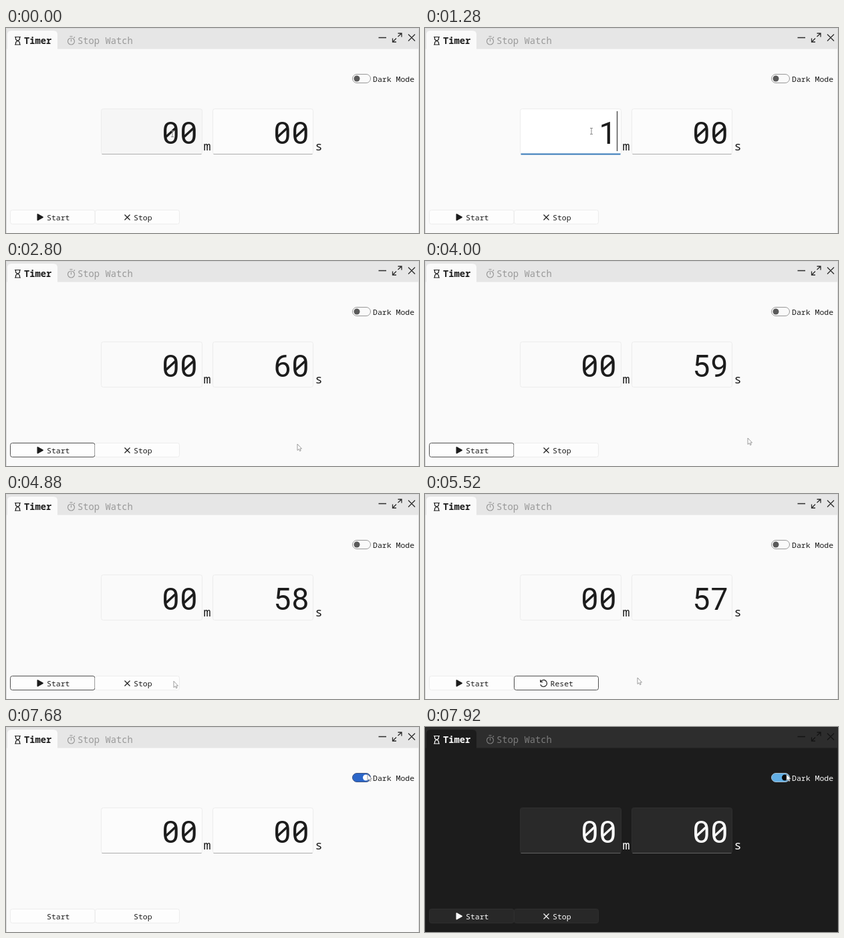
Write an HTML page that moves like this. It is 618 px wide and 308 px high and loops after 8 s.

```html
<!DOCTYPE html>
<html lang="en">
<head>
<meta charset="utf-8">
<title>Timer</title>
<style>
html, body { margin: 0; width: 100%; height: 100%; overflow: hidden; }
svg {
  display: block; width: 618px; height: 308px;
  font-family: "Roboto Mono", "Noto Sans Mono", "DejaVu Sans Mono", monospace;
  --bar: #e6e6e6; --body: #fafafa; --edge: #d9d9d9; --ink: #1c1c1c; --dim: #999;
  --field: #fcfcfc; --idle: #fafafa; --hover: #f6f6f6; --focus: #fff; --line: #ececec;
  --under: #adadad; --button: #fdfdfd; --ring: #505050; --win: #2c2c2c;
  --on: #2b66c9; --on-edge: #3f5480; --knob: #fff;
}
svg.dark {
  --bar: #2d2d2d; --body: #1c1c1c; --edge: #252525; --ink: #fafafa; --dim: #7c7c7c;
  --field: #292929; --line: #2e2e2e; --under: #626262; --button: #282828; --win: #141414;
  --on: #62aee4; --on-edge: #a9c0d0; --knob: #080808;
}
text { fill: var(--ink); white-space: pre; }
.small { font-size: 11.5px; }
.tab { font-size: 13.8px; }
.unit { font-size: 18.5px; }
.digit { font: 46px Roboto, "Open Sans", sans-serif; text-anchor: middle; }
.slash { stroke: var(--ink); stroke-width: 3.4; }
.icon { fill: none; stroke: var(--ink); stroke-width: 1.2; }
.solid { fill: var(--ink); }
.dim { stroke: var(--dim); }
.window { fill: none; stroke: var(--win); stroke-width: 1.3; }
.button { fill: var(--button); stroke: var(--line); }
.button.ring { stroke: var(--ring); }
.field { fill: var(--field); stroke: var(--line); }
.field.idle { fill: var(--idle); }
.field.hover { fill: var(--hover); }
.field.focus { fill: var(--focus); }
.under { stroke: var(--under); }
.under.focus { stroke: #3478b8; stroke-width: 2; }
</style>
</head>
<body>
<svg id="stage" viewBox="0 0 618 308">
  <rect width="618" height="308" fill="var(--body)"/>
  <rect width="618" height="31.5" fill="var(--bar)"/>
  <path d="M2 32V10Q2 4 8 4H71Q77 4 77 10V32Z" fill="var(--body)"/>
  <path d="M.5 308V.5H617.5V308" fill="none" stroke="var(--edge)"/>

  <path class="icon" d="M13 13.5H22M13 25H22M14.5 13.5V16Q14.5 18 17.5 19.2Q20.5 18 20.5 16V13.5M14.5 25V22.500Q14.5 20.500 17.5 19.2Q20.5 20.500 20.5 22.500V25"/>
  <text class="tab" x="27" y="24.300" font-weight="700">Timer</text>
  <g class="icon dim">
    <circle cx="97.500" cy="20" r="5"/>
    <path d="M95.500 12.500H99.500M97.500 16.500V20.500M101.500 15L103 13.500"/>
  </g>
  <text class="tab" x="107" y="24.300" font-weight="500" style="fill:var(--dim)">Stop Watch</text>
  <path class="window" d="M557.500 14.500H569M602 9.500L612 19.500M612 9.500L602 19.500M578.500 21L584 15.500M586.500 13L592 8M586.500 8H592V13.500M578.500 15.500V21H584"/>

  <rect id="track" x="518.500" y="69.500" width="27" height="13" rx="6.500"/>
  <circle id="knob" cy="76" r="4.500"/>
  <text class="small" x="549" y="81">Dark Mode</text>

  <g id="minutes">
    <rect class="field" x="142.500" y="121.500" width="151" height="68" rx="3"/>
    <path class="under" d="M143.500 189.500H292.500"/>
    <g class="digits" transform="translate(287 157)"></g>
  </g>
  <path id="caret" d="M287.500 125V185" stroke="var(--ink)"/>
  <text class="unit" x="295.500" y="184">m</text>
  <g id="seconds">
    <rect class="field" x="309.500" y="121.500" width="150" height="68" rx="3"/>
    <path class="under" d="M310.500 189.500H458.500"/>
    <g class="digits" transform="translate(454 157)"></g>
  </g>
  <text class="unit" x="462.500" y="184">s</text>

  <rect id="startBox" class="button" x="6.500" y="273.500" width="126.500" height="21" rx="3"/>
  <rect id="stopBox" class="button" x="133.500" y="273.500" width="126" height="21" rx="3"/>
  <text class="small" x="61" y="289">Start</text>
  <text id="stopLabel" class="small" y="289"></text>
  <g id="icons">
    <path class="solid" d="M46.500 280Q46.500 278.500 48 279.200L55.500 283.500Q56.500 284.300 55.500 285L48 289.300Q46.500 290 46.500 288.500Z"/>
    <path id="cross" class="icon" d="M177.500 280.500L185.500 288.500M185.500 280.500L177.500 288.500"/>
    <path id="redo" class="icon" d="M172.800 279V282.500H176.300M173 282.300A5 5 0 1 1 172.800 286.200"/>
  </g>

  <path id="beam" d="M-2 -4.500H2M-2 4.500H2M0 -4.500V4.500" fill="none" stroke="#8a8a8a"/>
  <path id="arrow" d="M0 0V9.500L2.200 7.500L3.700 10.700L5.200 10L3.800 7H6.500Z" fill="#fff" stroke="#858585" stroke-width=".8"/>
</svg>
<script>
const LOOP = 8000, STEP = 80, PITCH = 27;
const FOCUS = 320, START = 2160, STOP = 5200, RESET = 6240;
const TOGGLE = 7440, ICONS_OFF = 7640, DARK = 7760;
const pointer = [ // time, x, y
  [0, 249, 159], [480, 249, 155], [1520, 249, 155], [2080, 78, 284],
  [2320, 78, 284], [2800, 436, 275], [3300, 470, 270], [4000, 483, 266],
  [4400, 483, 266], [5040, 208, 284], [5240, 208, 284], [5520, 318, 276],
  [5680, 318, 276], [6080, 208, 284], [6400, 208, 284], [7280, 541, 71], [8000, 541, 71]
];
const $ = id => document.getElementById(id);
const stage = $("stage");
const show = (el, on) => { el.style.display = on ? "" : "none"; };
const ease = p => p * p * (3 - 2 * p);
const pad = n => String(n).padStart(2, "0");

function pointerAt(t) {
  const i = Math.max(1, pointer.findIndex(k => k[0] > t));
  const [t0, x0, y0] = pointer[i - 1], [t1, x1, y1] = pointer[i];
  const p = ease((t - t0) / (t1 - t0));
  return [x0 + (x1 - x0) * p, y0 + (y1 - y0) * p];
}

function typedMinutes(t) {
  if (t < 720) return "00";
  if (t < 880) return "0";
  return t < 1040 ? "" : "1";
}

// Right-aligned digits; zeros get a slash.
function digits(text) {
  return [...text].map((d, i) => {
    const x = (i - text.length + 0.5) * PITCH;
    const slash = d === "0" ? `<path class="slash" d="M${x - 7} 6.500L${x + 7} -6.500"/>` : "";
    return `<text class="digit" x="${x}" y="16.500">${d}</text>${slash}`;
  }).join("");
}

function setField(id, text, state) {
  const [box, under, group] = $(id).children;
  box.setAttribute("class", "field " + state);
  under.setAttribute("class", "under " + state);
  show(under, state !== "idle");
  if (group.dataset.text !== text) {
    group.dataset.text = text;
    group.innerHTML = digits(text);
  }
}

function render(t) {
  const dark = t >= DARK;
  const running = t >= START && t < RESET;
  const focused = t >= FOCUS && t < START;
  const stopped = t >= STOP && t < RESET;
  const left = 60 - Math.floor((Math.min(t, STOP) - START) / 1000);
  stage.classList.toggle("dark", dark);

  const minuteState = running ? "idle" : focused ? "focus" : t < FOCUS ? "hover" : "";
  setField("minutes", t < START ? typedMinutes(t) : "00", minuteState);
  setField("seconds", running ? pad(left) : "00", running ? "idle" : "");
  show($("caret"), focused && (t - FOCUS) % 1060 < 530 || t >= 1040 && t < 1560);

  $("startBox").classList.toggle("ring", t >= START && t < STOP);
  $("stopBox").classList.toggle("ring", t >= STOP && t < TOGGLE);
  $("stopLabel").textContent = stopped ? "Reset" : "Stop";
  $("stopLabel").setAttribute("x", stopped ? 187.5 : 191);
  show($("icons"), t < ICONS_OFF || dark);
  show($("cross"), !stopped);
  show($("redo"), stopped);

  const on = t >= TOGGLE;
  const slide = ease(Math.min(1, Math.max(0, (t - TOGGLE) / 160)));
  $("track").setAttribute("fill", on ? "var(--on)" : "var(--body)");
  $("track").setAttribute("stroke", on ? "var(--on-edge)" : "#989898");
  $("knob").setAttribute("fill", on ? "var(--knob)" : "#5a5a5a");
  $("knob").setAttribute("cx", 525 + 13.5 * slide);

  const [x, y] = pointerAt(t);
  const overField = x > 142 && x < 460 && y > 121 && y < 190 && t < START;
  for (const id of ["beam", "arrow"]) {
    $(id).setAttribute("transform", `translate(${x} ${y})`);
    show($(id), overField === (id === "beam"));
  }
}

const begin = performance.now();
function frame() {
  const t = (performance.now() - begin) % LOOP;
  render(Math.floor(t / STEP) * STEP);
  requestAnimationFrame(frame);
}
frame();
</script>
</body>
</html>
```
